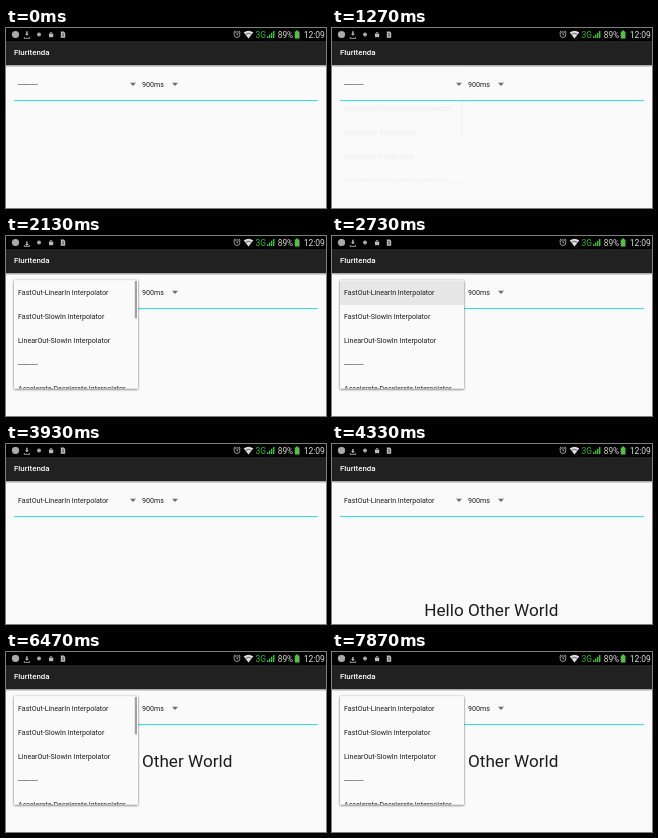
Recreate the animation shown at these times as an HTML page. Size 320x180 px, loop 8 s.

```html
<!DOCTYPE html>
<html lang="en">
<head>
<meta charset="utf-8">
<title>Fluritenda</title>
<style>
  html, body { margin: 0; width: 100%; height: 100%; overflow: hidden; background: #fafafa; }
  svg { display: block; width: 100vw; height: 100vh; font-family: Roboto, sans-serif; }
  .label { font-size: 7.1px; fill: #1c1c1c; }
  .status { font-size: 8.3px; fill: #ddd; }
  .icon { fill: none; stroke: #bbb; stroke-width: .8; }
</style>
</head>
<body>
<svg viewBox="0 0 320 180">
  <defs>
    <clipPath id="listClip"><rect x="8" y="44" width="124" height="108.6"/></clipPath>
    <filter id="shadow" x="-10%" y="-10%" width="120%" height="120%">
      <feDropShadow dx="0" dy=".7" stdDeviation="1" flood-color="#000" flood-opacity=".65"/>
    </filter>
    <linearGradient id="barShadow" x2="0" y2="1">
      <stop stop-color="#000" stop-opacity=".4"/>
      <stop offset="1" stop-color="#000" stop-opacity="0"/>
    </linearGradient>
  </defs>

  <rect width="320" height="180" fill="#fafafa"/>
  <text id="hello" class="label" x="92.3" style="font-size:17.15px">Hello Other World</text>

  <!-- Status bar -->
  <rect width="320" height="13" fill="#000"/>
  <circle cx="9.5" cy="6.5" r="3.6" fill="#aaa"/>
  <path class="icon" d="M18.3 9v1.4h5.2V9"/>
  <path id="download" d="M20.2 3.3h1.4v2.4h1.2l-1.9 2-1.9-2h1.2z" fill="#bbb"/>
  <circle cx="33" cy="6.5" r="2" fill="#aaa"/>
  <path d="M43 5.8h4.2v3.4H43z" fill="#bbb"/>
  <path class="icon" d="M44 6V5q1.1-1.8 2.2 0v1"/>
  <path d="M54.8 3.5h3l1.4 1.4v4.8h-4.4z" fill="#bbb"/>
  <path d="M56 5.8h2M56 7.6h2" stroke="#222" stroke-width=".7"/>
  <g class="icon">
    <circle cx="231" cy="6.6" r="2.9"/>
    <path d="M231 4.8v2h1.4M227.5 4.4l1.8-1.6M234.5 4.4l-1.8-1.6"/>
  </g>
  <path d="M237.7 4.6Q242.5 .8 247.3 4.6L242.5 10.5z" fill="#ddd"/>
  <path d="M239.7 6.3q2.8-2 5.6 0" fill="none" stroke="#333" stroke-width=".7"/>
  <text x="249.5" y="9.6" class="status" style="font-size:8.4px;fill:#2fbf2f">3G</text>
  <path d="M261 10V8.2h1.4V10zM263 10V6.6h1.4V10zM265 10V4.8h1.4V10zM267 10V3h1.4V10z" fill="#3ac63a"/>
  <text x="271.8" y="9.6" class="status">89%</text>
  <path d="M288.7 3.4h1.4v-1h2v1h1.4v7h-4.8z" fill="#4cc43c"/>
  <text x="297.7" y="9.6" class="status" style="font-size:8.5px">12:09</text>

  <!-- App bar -->
  <rect y="13" width="320" height="24" fill="#212121"/>
  <rect y="37" width="320" height="2.5" fill="url(#barShadow)"/>
  <text x="8" y="27.4" fill="#fff" font-size="7.9" font-weight="500">Fluritenda</text>

  <!-- Spinners -->
  <text id="selected" class="label" x="12" y="59.4"></text>
  <path id="arrow" d="M124 54.8h6l-3 3.1z"/>
  <text class="label" x="136" y="59.4">900ms</text>
  <path d="M166 54.8h6l-3 3.1z" fill="#6c6c6c"/>
  <rect x="8" y="72" width="304" height="1.1" fill="#2ee4ea"/>

  <!-- Drop-down -->
  <g id="popup">
    <rect x="8" y="44.2" width="124" height="108.4" fill="#fafafa" filter="url(#shadow)"/>
    <rect id="highlight" x="8" y="44.6" width="124" height="24.4" fill="#e7e7e7"/>
    <g clip-path="url(#listClip)"><g id="list"></g></g>
    <rect id="thumb" x="128.8" width="2.2" height="37.4" fill="#a2a2a2"/>
  </g>
</svg>
<script>
const LOOP = 8000, ROW = 24, DASHES = '-'.repeat(10);
const items = ['FastOut-LinearIn', 'FastOut-SlowIn', 'LinearOut-SlowIn', '',
  'Accelerate-Decelerate', 'Accelerate', 'Anticipate', 'Anticipate-Overshoot']
  .map(name => name ? name + ' Interpolator' : DASHES);

const el = id => document.getElementById(id);
const set = (id, attribute, value) => el(id).setAttribute(attribute, value);
const shift = (id, y) => set(id, 'transform', `translate(0 ${y})`);
const ramp = (t, start, duration) => Math.min(1, Math.max(0, (t - start) / duration));
const between = (t, a, b) => t >= a && t < b;

el('list').innerHTML = items.map((text, i) =>
  `<text class="label" x="12" y="${59.4 + i * ROW}">${text}</text>`).join('');

// cubic-bezier(.4, 0, 1, 1), solved by bisection
function fastOutLinearIn(x) {
  let low = 0, high = 1;
  for (let i = 0; i < 20; i++) {
    const s = (low + high) / 2;
    const bx = 1.2 * s * (1 - s) ** 2 + 3 * s * s * (1 - s) + s ** 3;
    if (bx < x) low = s; else high = s;
  }
  return 3 * low * low * (1 - low) + low ** 3;
}

function draw(t) {
  shift('download', [0, .5, 1, 1.6, 2.2, 1.2][Math.floor(t / 200) % 6]);

  const pressed = between(t, 1100, 1270) || between(t, 5650, 5860);
  set('arrow', 'fill', pressed ? '#444' : '#6c6c6c');
  el('selected').textContent = t < 3000 ? DASHES : items[0];

  const open = ramp(t, 1260, 200) - ramp(t, 3000, 180) + ramp(t, 5860, 220);
  set('popup', 'opacity', open);
  set('highlight', 'opacity', between(t, 2500, 3200) ? ramp(t, 2550, 120) : 0);

  const drag = ramp(t, 1800, 310);
  const scroll = 3 * ROW * (1 - drag * drag * (3 - 2 * drag));
  shift('list', -scroll);
  set('thumb', 'y', 45 + scroll * .37);
  const thumbFade = t < 5000 ? ramp(t, 2410, 250) : ramp(t, 7080, 250);
  set('thumb', 'opacity', 1 - thumbFade);

  set('hello', 'y', 115 + 200 * (1 - fastOutLinearIn(ramp(t, 3600, 900))));
}

function tick() {
  draw(performance.now() % LOOP);
  requestAnimationFrame(tick);
}
tick();
</script>
</body>
</html>
```
